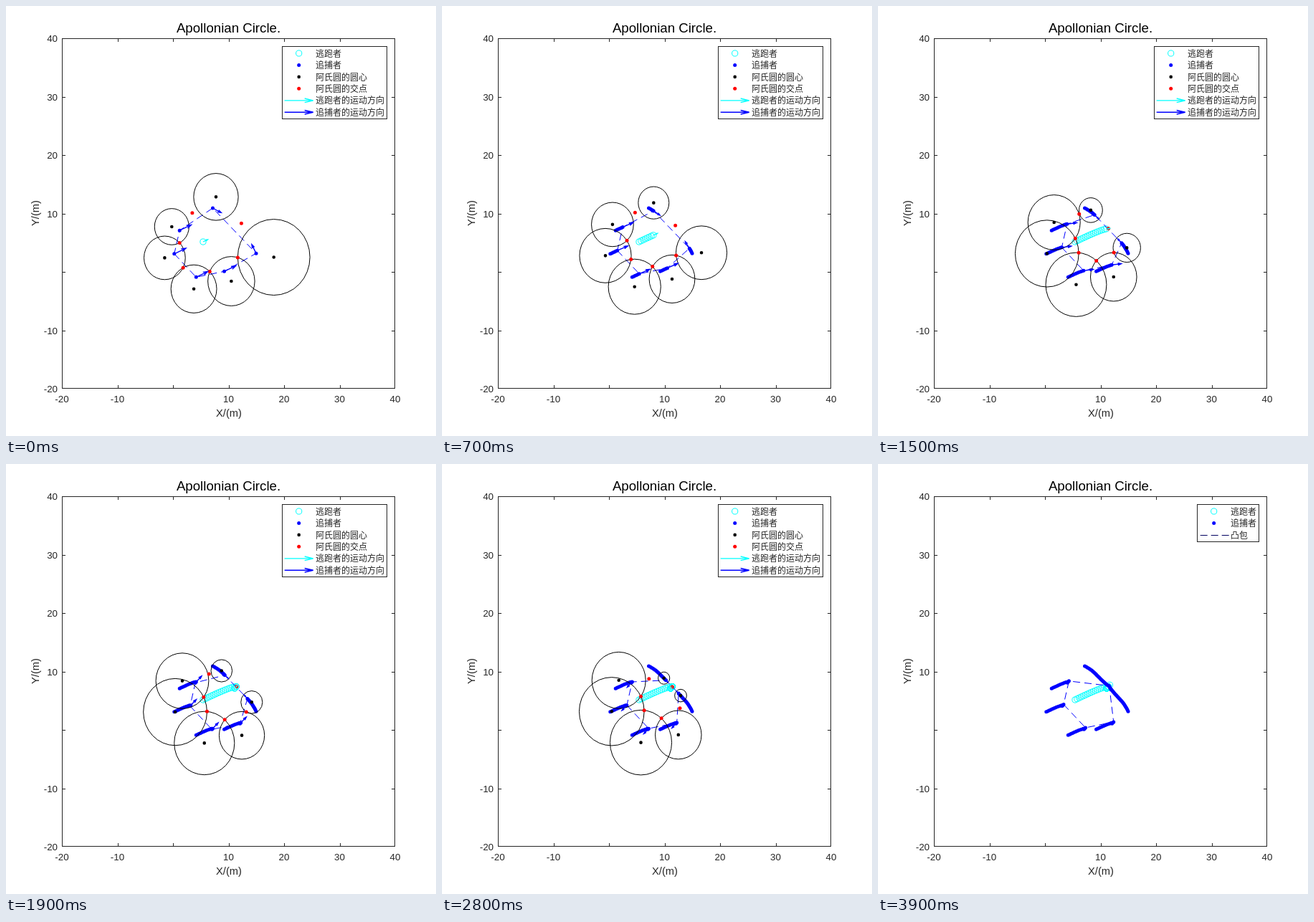
An HTML page that plays this animation: 600x600 px, repeating every 4900 ms.

```html
<!DOCTYPE html>
<html lang="zh">
<head>
<meta charset="utf-8">
<title>Apollonian Circle</title>
<style>
html, body { margin: 0; width: 100%; height: 100%; overflow: hidden; background: #fff; }
svg { display: block; width: 100vw; height: 100vh; }
text { font-family: "Liberation Sans", Arial, sans-serif; fill: #262626; }
.legend text { font: 300 12px "Noto Sans CJK SC", "Noto Sans CJK", sans-serif; }
path { fill: none; }
.box { fill: #fff; stroke: #262626; }
.run { stroke: #0ff; }
.dot { stroke: #00f; stroke-width: 5; stroke-linecap: round; }
.mid { stroke: #000; stroke-width: 4.6; stroke-linecap: round; }
.cut { stroke: #f00; stroke-width: 5; stroke-linecap: round; }
.ring { stroke: #000; }
.hull { stroke: #00f; stroke-dasharray: 10 6; }
.aim { stroke: #0ff; stroke-width: 1.3; }
.go { stroke: #00f; stroke-width: 1.4; }
.key { stroke: #000060; stroke-dasharray: 10 5; }
</style>
</head>
<body>
<svg id="stage" viewBox="0 0 600 600"></svg>
<script>
const STEP = 100, LAST = 39, LOOP = 4900;
const X = x => 78 + (x + 20) * 7.75;
const Y = y => 534 - (y + 20) * 8.15;

// vectors
const add = (a, b, s = 1) => [a[0] + b[0] * s, a[1] + b[1] * s];
const sub = (a, b) => add(a, b, -1);
const mul = (a, s) => [a[0] * s, a[1] * s];
const dot = (a, b) => a[0] * b[0] + a[1] * b[1];
const len = a => Math.hypot(a[0], a[1]);
const unit = a => mul(a, 1 / (len(a) || 1));
const px = p => [X(p[0]), Y(p[1])];
const at = p => p[0].toFixed(2) + ' ' + p[1].toFixed(2);

// path pieces in pixels
const spot = p => `M${at(p)}h.01`;
const oval = (p, rx, ry = rx) =>
  `M${at([p[0] - rx, p[1]])}a${rx} ${ry} 0 1 0 ${2 * rx} 0a${rx} ${ry} 0 1 0 ${-2 * rx} 0`;
function arrow(a, b, headLen = 0.36, headWide = 0.12) {
  const v = sub(b, a), base = add(b, v, -headLen), side = [-v[1] * headWide, v[0] * headWide];
  return `M${at(a)}L${at(b)}M${at(add(base, side))}L${at(b)}L${at(sub(base, side))}`;
}

const svg = document.getElementById('stage');
function el(tag, attrs, parent = svg, label) {
  const e = document.createElementNS('http://www.w3.org/2000/svg', tag);
  for (const k in attrs) e.setAttribute(k, attrs[k]);
  if (label) e.textContent = label;
  return parent.appendChild(e);
}
const path = (cls, d = '', parent = svg) => el('path', { class: cls, d }, parent);
const text = (x, y, size, anchor, label, more = {}) =>
  el('text', { x, y, 'font-size': size, 'text-anchor': anchor, ...more }, svg, label);

function drawAxes() {
  el('rect', { class: 'box', x: 78.5, y: 45.5, width: 464, height: 488 });
  let ticks = '';
  for (let v = -20; v <= 40; v += 10) {
    const x = Math.min(542, Math.round(X(v))) + 0.5, y = Math.min(533, Math.round(Y(v))) + 0.5;
    ticks += `M${x} 533v-4M${x} 46v4M79 ${y}h4M542 ${y}h-4`;
    text(X(v), 553, 13.33, 'middle', v);
    text(72, Y(v) + 5.3, 13.33, 'end', v);
  }
  el('path', { d: ticks, stroke: '#262626' });
  text(310.5, 37, 18.67, 'middle', 'Apollonian Circle.', { style: 'fill:#000' });
  text(311, 573, 14.67, 'middle', 'X/(m)');
  text(0, 0, 14.67, 'middle', 'Y/(m)', { transform: 'translate(46 289) rotate(-90)' });
}

// rows: [class, path maker, label]
function legend(left, height, rows) {
  const g = el('g', { class: 'legend' });
  el('rect', { class: 'box', x: left + 0.5, y: 56.5, width: 531 - left, height }, g);
  rows.forEach(([cls, make, label], i) => {
    const y = 66 + i * 16.45;
    path(cls, make(left + 23.7, y), g);
    el('text', { x: left + 47, y: y + 4.6 }, g, label);
  });
  return g;
}

// pursuers 0 and 5 close the gap, the others run parallel to the evader
function simulate() {
  let e = [5.42, 5.15];
  let ps = [[7.16, 10.92], [1.19, 7.09], [0.23, 3.09], [4.17, -0.9], [9.23, 0.09], [14.97, 3.17]];
  const span = sub(ps[5], ps[0]), n = unit([-span[1], span[0]]);
  const out = [];
  for (let k = 0; k <= LAST; k++) {
    const m = mul(add(ps[0], ps[5]), 0.5);
    const goal = add(m, n, dot(sub(m, e), n) / 3);
    const up = k % 2 || k === LAST - 1;
    const u = k <= 15 ? unit(sub(goal, e)) : mul(n, up ? 1 : -1);
    const reach = 2.3 - 0.037 * k;
    const closes = i => i === 0 || i === 5;
    out.push({
      e, ps,
      aim: mul(u, 0.4 * reach),
      go: ps.map((p, i) => closes(i) ? mul(sub(goal, p), 0.295) : mul(u, reach))
    });
    ps = ps.map((p, i) => closes(i) ? add(p, unit(sub(goal, p)), 0.1414) : add(p, u, 0.2));
    e = add(e, u, 0.4);
  }
  return out;
}

// crossing nearer the evader, or the radical-axis point when apart
function crossing(a, b, e) {
  const v = sub(b.c, a.c), d = len(v), w = unit(v);
  const s = (d * d + a.r * a.r - b.r * b.r) / (2 * d);
  const h = Math.sqrt(Math.max(0, a.r * a.r - s * s));
  const foot = add(a.c, w, s), side = [-w[1], w[0]];
  const p = add(foot, side, h), q = add(foot, side, -h);
  return len(sub(p, e)) < len(sub(q, e)) ? p : q;
}

drawAxes();
const layer = {};
for (const c of ['run', 'dot', 'hull', 'ring', 'mid', 'cut', 'aim', 'go']) layer[c] = path(c);

const ringKey = (x, y) => oval([x, y], 4.1);
const dotKey = (x, y) => spot([x, y]);
const arrowKey = (x, y) => arrow([x - 20, y], [x + 20, y], 0.3, 0.07);
const both = [['run', ringKey, '逃跑者'], ['dot', dotKey, '追捕者']];
const mainKey = legend(385, 101, [
  ...both,
  ['mid', dotKey, '阿氏圆的圆心'],
  ['cut', dotKey, '阿氏圆的交点'],
  ['aim', arrowKey, '逃跑者的运动方向'],
  ['go', arrowKey, '追捕者的运动方向']
]);
const endKey = legend(445, 52, [
  ...both,
  ['key', (x, y) => `M${x - 19} ${Math.round(y) + 0.5}h40`, '凸包']
]);

const states = simulate();

function draw(k) {
  const { e, ps, aim, go } = states[k];
  const past = states.slice(0, k + 1), done = k === LAST;
  const set = (name, d) => layer[name].setAttribute('d', d);
  const live = (name, parts) => set(name, done ? '' : parts.join(''));
  const circles = ps.map(p => {
    const v = sub(p, e);
    return { c: add(e, v, 4 / 3), r: len(v) * 2 / 3 };
  });
  set('run', past.map(s => oval(px(s.e), 4.1)).join(''));
  set('dot', past.map(s => s.ps.map(p => spot(px(p))).join('')).join(''));
  set('hull', 'M' + [2, 3, 4, 5, 0, 1].map(i => at(px(ps[i]))).join('L') + 'Z');
  live('ring', circles.map(o => oval(px(o.c), o.r * 7.75, o.r * 8.15)));
  live('mid', circles.map(o => spot(px(o.c))));
  live('cut', circles.map((o, i) => spot(px(crossing(o, circles[(i + 1) % 6], e)))));
  live('aim', [arrow(px(e), px(add(e, aim)))]);
  live('go', ps.map((p, i) => arrow(px(p), px(add(p, go[i])))));
  mainKey.style.display = done ? 'none' : '';
  endKey.style.display = done ? '' : 'none';
}

let shown = -1;
const start = performance.now();
function tick(now) {
  const t = Math.max(0, now - start) % LOOP;
  const k = Math.min(LAST, Math.floor(t / STEP));
  if (k !== shown) draw(shown = k);
  requestAnimationFrame(tick);
}
tick(start);
</script>
</body>
</html>
```
